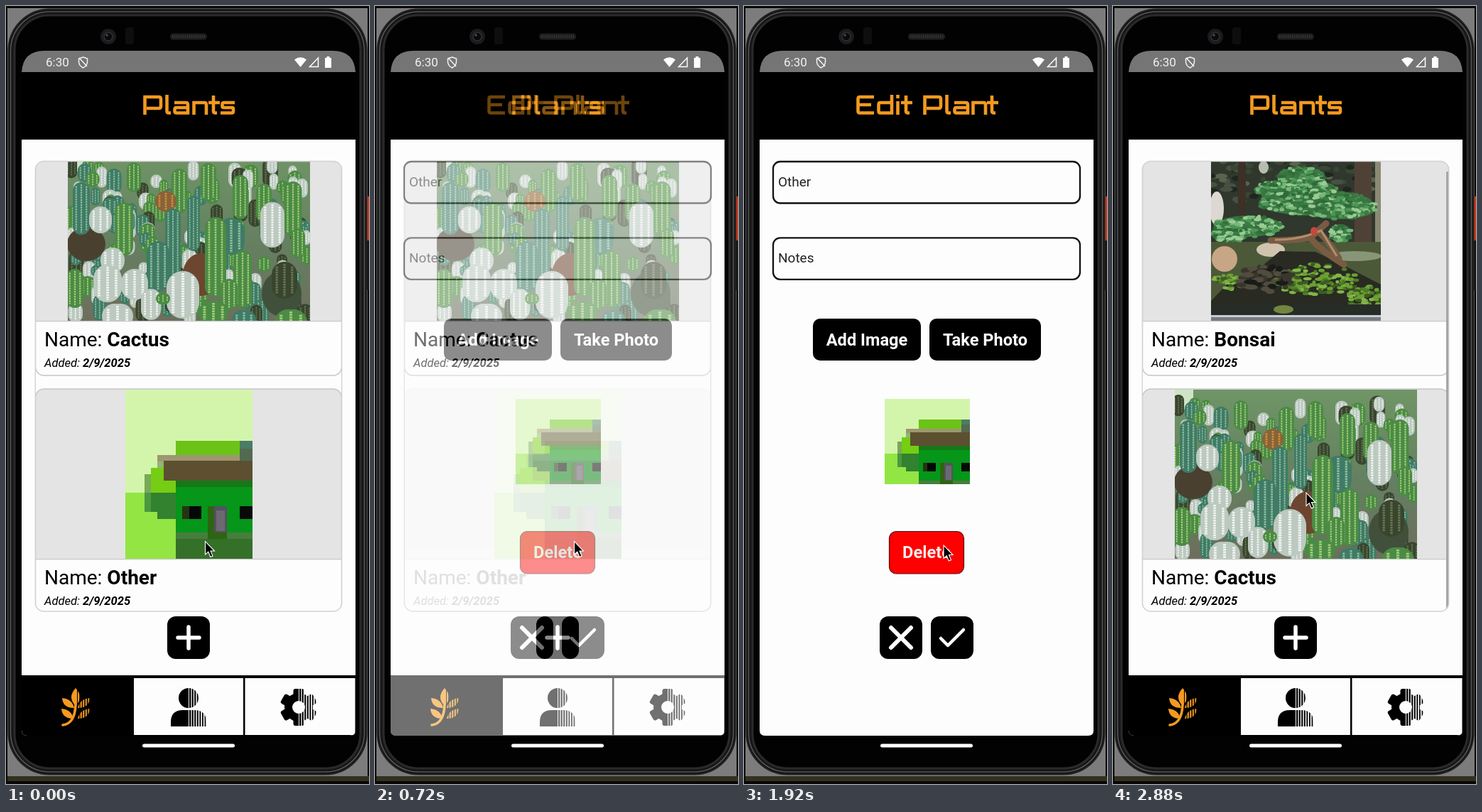
These frames come from a looping animation (511 by 1095 pixels, 2960 ms). An HTML page:

```html
<!DOCTYPE html>
<html lang="en">
<head>
<meta charset="utf-8">
<title>Plants</title>
<style>
html, body { margin: 0; width: 100%; height: 100%; overflow: hidden; background: #000; }
svg { display: block; width: 100%; height: 100%; font-family: Roboto, sans-serif; }
</style>
</head>
<body>
<svg id="stage" viewBox="0 0 511 1095"></svg>
<script>
const LOOP = 2960, STEP = 80;
const stage = document.getElementById('stage');

const rect = (x, y, w, h, fill, r = 0, extra = '') =>
  `<rect x="${x}" y="${y}" width="${w}" height="${h}" rx="${r}" fill="${fill}" ${extra}/>`;
const oval = (x, y, rx, ry, fill, extra = '') =>
  `<ellipse cx="${x}" cy="${y}" rx="${rx}" ry="${ry}" fill="${fill}" ${extra}/>`;
const path = (d, fill, extra = '') => `<path d="${d}" fill="${fill}" ${extra}/>`;
const line = (d, color, width, extra = '') =>
  path(d, 'none', `stroke="${color}" stroke-width="${width}" ${extra}`);
const text = (x, y, size, str, extra = '') =>
  `<text x="${x}" y="${y}" font-size="${size}" ${extra}>${str}</text>`;
const clip = (id, shape) => `<clipPath id="${id}">${shape}</clipPath>`;

function seeded(seed) {
  return () => (seed = (seed * 16807) % 2147483647) / 2147483647;
}

// Title lettering, drawn as strokes on a baseline at 0
const GLYPHS = {
  P: 'M2.5 0V-25H22Q25 -25 25 -22V-12Q25 -9 22 -9H5',
  E: 'M25 -25H5Q2.5 -25 2.5 -22V-5Q2.5 -2.5 5 -2.5H25M3 -14H21',
  l: 'M2.5 -28V-5Q2.5 -2.5 5 -2.5H8',
  a: 'M2 -17H18Q21 -17 21 -14V-2.5H5Q2.5 -2.5 2.5 -5V-7Q2.5 -10 5 -10H20',
  n: 'M2.5 0V-17H17Q20 -17 20 -14V0',
  t: 'M7 -27V-5Q7 -2.5 10 -2.5H12M0 -17H16',
  s: 'M20 -17H5Q2.5 -17 2.5 -15V-12Q2.5 -10 5 -10H16Q18 -10 18 -8V-5Q18 -2.5 16 -2.5H0',
  d: 'M21 -28V-2.5H5Q2.5 -2.5 2.5 -5V-14Q2.5 -17 5 -17H20',
  i: 'M2.5 0V-19M2.5 -23V-28'
};
const title = (letters, xs) => [...letters].map((c, i) =>
  line(GLYPHS[c], '#f39a1f', 4.6, `transform="translate(${xs[i]} 153)"`)).join('');

function cactusPhoto() {
  const rnd = seeded(41);
  const tones = [
    ['#4b8b45', '#a3cd78'], ['#3f7b66', '#8dbd9c'], ['#bcc9c0', '#f1f5f0'],
    ['#39452f', '#687850'], ['#8a6238', '#c9923f']
  ];
  const plant = (x, top, w, bottom, tone) => {
    const [body, rib] = tones[tone];
    let out = rect(x - w / 2, top, w, bottom - top, body, Math.min(w, bottom - top) / 2);
    for (const k of [-0.3, 0, 0.3]) {
      const inset = 3 + Math.abs(k) * w * 0.35;
      out += line(`M${x + k * w} ${top + inset}V${bottom - inset}`, rib, Math.max(1.4, w * 0.09), 'stroke-dasharray="2.5 1"');
    }
    return out;
  };
  let out = rect(87, 205, 341, 238, 'url(#field)') + rect(87, 205, 26, 28, '#cfe3c6');
  for (let i = 0; i < 150; i++) {
    const y = 212 + i * 1.4, x = 92 + rnd() * 332, w = 12 + rnd() * 10;
    const pick = rnd();
    const tone = pick < 0.3 ? 0 : pick < 0.52 ? 1 : pick < 0.82 ? 2 : 3;
    out += plant(x, y, w, y + w * (1.1 + rnd()), tone);
  }
  out += oval(113, 335, 27, 24, '#4a4030') + oval(275, 378, 26, 30, '#6d4630') + oval(388, 405, 28, 32, '#41503a');
  const grid = [
    [180, 220, 20, 262, 0], [285, 221, 22, 275, 0], [244, 229, 22, 292, 0],
    [330, 238, 22, 300, 0], [363, 250, 22, 305, 0], [106, 248, 24, 322, 1],
    [404, 247, 25, 325, 0], [225, 260, 30, 290, 4], [133, 282, 32, 320, 2],
    [375, 276, 34, 340, 2], [166, 276, 26, 352, 0], [264, 267, 18, 345, 1],
    [411, 313, 20, 355, 0], [235, 285, 22, 385, 1], [150, 340, 34, 376, 2],
    [97, 370, 24, 425, 0], [214, 331, 32, 402, 1], [317, 298, 38, 350, 1],
    [295, 297, 30, 410, 0], [333, 344, 26, 425, 0], [314, 384, 24, 428, 0],
    [392, 360, 36, 412, 3], [143, 364, 40, 417, 2], [181, 370, 38, 414, 2],
    [249, 373, 46, 440, 2], [204, 398, 28, 442, 2]
  ];
  out += grid.map(p => plant(...p)).join('');
  for (const [x, y, w, tone] of [[157, 419, 44, 2], [221, 404, 20, 0], [292, 415, 42, 0], [335, 428, 34, 1], [401, 427, 46, 0]])
    out += plant(x, y, w, y + w * 0.8, tone);
  return `<g id="cactus" clip-path="url(#cactusBox)">${out}</g>`;
}

function bonsaiPhoto() {
  const rnd = seeded(77);
  const scatter = (cx, cy, rx, ry, n, colors, size) => {
    let out = '';
    for (let i = 0; i < n; i++) {
      const a = rnd() * 6.283, r = Math.sqrt(rnd());
      out += oval(cx + rx * r * Math.cos(a), cy + ry * r * Math.sin(a), size * (0.6 + rnd()), size * 0.6,
        colors[Math.floor(rnd() * colors.length)]);
    }
    return out;
  };
  const leaves = ['#2f6a3a', '#4d9656', '#76b878', '#9acb95', '#3b7c45'];
  const moss = ['#4d7e25', '#6c9f35', '#83b548', '#3c5c22'];
  const canopy = [[265, 240, 34, 13], [258, 258, 58, 14], [285, 277, 80, 18], [320, 284, 52, 16], [190, 310, 48, 15], [165, 322, 26, 10], [320, 320, 15, 13]];
  let out = rect(138, 205, 239, 238, '#30372c');
  out += scatter(255, 240, 130, 45, 130, ['#1e271e', '#465142', '#394636', '#59634f'], 6);
  out += rect(176, 219, 11, 75, '#3c3027') + rect(340, 219, 24, 125, '#504136') + rect(369, 219, 8, 120, '#8b8a75');
  out += oval(146, 285, 10, 24, '#dcd8d1') + oval(212, 227, 7, 9, '#b6bdb0');
  out += rect(138, 332, 239, 111, '#4c5938') + oval(157, 356, 18, 18, '#c6a685') + oval(222, 343, 20, 10, '#d1c4af') + oval(340, 352, 38, 7, '#889576');
  out += path('M138 415L165 387L205 370L235 345L285 346L325 365L377 392V425H138Z', '#292a22');
  out += scatter(285, 385, 58, 22, 140, moss, 4) + scatter(165, 388, 25, 11, 45, moss, 3.5) + scatter(354, 409, 25, 17, 65, moss, 4);
  out += scatter(215, 384, 40, 18, 55, ['#181b18', '#39372d', '#514c3e'], 6);
  out += line('M222 330Q255 330 278 326L300 306M278 327Q294 345 325 364M292 320Q307 336 318 355', '#795b44', 9, 'stroke-linecap="round"');
  out += line('M228 329Q260 330 293 316L315 352', '#b18d6a', 3);
  for (const [x, y, rx, ry] of canopy)
    out += oval(x, y, rx, ry, '#39743f') + scatter(x, y, rx, ry, Math.round(rx * 2.5), leaves, 3.8);
  out += oval(283, 317, 5, 6, '#c9473b') + rect(138, 420, 239, 17, '#272c26') + oval(240, 427, 14, 6, '#728640');
  out += rect(138, 435, 239, 3, '#c8cbd0') + rect(138, 438, 239, 5, '#777a82');
  return `<g id="bonsai" clip-path="url(#bonsaiBox)">${out}</g>`;
}

// Blocky house, in the coordinates of the lower card
const house = '<g id="house" shape-rendering="crispEdges">' + [
  [168, 540, 179, 238, '#d3f5ab'], [168, 685, 71, 93, '#93e543'], [239, 612, 90, 20, '#6bc317'],
  [213, 632, 9, 27, '#91b66f'], [204, 650, 35, 36, '#75ce13'], [195, 659, 9, 53, '#78a957'],
  [204, 685, 35, 27, '#32822f'], [195, 685, 9, 27, '#4a9840'], [213, 712, 26, 10, '#32822f'],
  [213, 632, 116, 9, '#9e976f'], [222, 640, 125, 28, '#5c5030'], [329, 612, 18, 11, '#4b7c68'],
  [329, 623, 18, 17, '#526a50'], [239, 668, 108, 9, '#167817'], [239, 677, 108, 73, '#05961a'],
  [239, 741, 108, 9, '#477d3d'], [239, 750, 108, 28, '#357029'], [248, 704, 27, 18, '#050805'],
  [248, 704, 10, 18, '#263414'], [329, 704, 18, 18, '#080a08'], [284, 704, 27, 46, '#2d6512'],
  [293, 704, 18, 37, '#56515e'], [296, 710, 12, 29, '#6c6973']
].map(b => rect(...b)).join('') + '</g>';

const use = (id, dy = 0) => `<use href="#${id}" transform="translate(0 ${dy})"/>`;

function card(dy, name, picture, id = '') {
  return `<g ${id && `id="${id}"`} transform="translate(0 ${dy})">
    ${rect(41.5, 204, 431, 316, '#fdfdfd', 12)}
    <g clip-path="url(#cardBox)">${rect(41, 204, 432, 239, '#e4e4e4')}${picture}${rect(41, 443, 432, 1.3, '#c9c9c9')}</g>
    ${rect(41.5, 204, 431, 316, 'none', 12, 'stroke="#c6c6c6" stroke-width="1.5"')}
    ${text(54, 479, 28, `Name: <tspan font-weight="700">${name}</tspan>`)}
    ${text(54, 508, 16.5, 'Added: <tspan font-weight="700">2/9/2025</tspan>', 'font-style="italic"')}
  </g>`;
}
const list = (id, cards) => `<g id="${id}"><g clip-path="url(#listBox)">${cards}</g>
  ${rect(41.3, 218.5, 431.4, 633.5, 'none', 12, 'stroke="#d2d2d2" stroke-width="1.4"')}</g>`;

const iconBox = x => rect(x, 859, 60, 60, '#000', 12);
const sign = (d, w) => line(d, '#fff', w, 'stroke-linecap="round" stroke-linejoin="round"');

function stripeMask(id, x) {
  let out = rect(x - 50, 940, 50, 90, '#fff');
  for (let i = 0; i < 8; i++) out += rect(x + 1 + i * 3.6, 940, 2.3 - i * 0.1, 90, '#fff');
  return `<mask id="${id}" maskUnits="userSpaceOnUse" x="${x - 50}" y="940" width="100" height="90">${out}</mask>`;
}
function tabs() {
  const leaf = (x, y, flip) => path('M0 0Q-16 0 -17 -14Q-3 -13 0 0Z', '#f39a1f', `transform="translate(${x} ${y}) scale(${flip} 1)"`);
  const plant = path('M98 960Q110 973 98 985Q86 973 98 960Z', '#f39a1f') +
    leaf(96, 988, 1) + leaf(101, 988, -1) + leaf(95, 1003, 1) + leaf(101, 1003, -1) +
    line('M80 1012Q97 1010 98 983', '#f39a1f', 3.6, 'stroke-linecap="round"');
  const person = oval(257, 974, 14, 14, '#000') + path('M232 1014V1008Q232 991 249 991H265Q282 991 282 1008V1014Z', '#000');
  let gear = '<circle cx="412" cy="987" r="14.5" fill="none" stroke="#000" stroke-width="11"/>';
  for (let i = 0; i < 6; i++)
    gear += rect(404.5, 961, 15, 11, '#000', 3, `transform="rotate(${i * 60} 412 987)"`);
  const icon = (id, art) => `<g mask="url(#${id})">${art}</g>`;
  return rect(22, 942, 470, 85, '#000') + rect(180, 946, 154, 80, '#fdfdfd') + rect(336.5, 946, 155, 80, '#fdfdfd') +
    icon('m1', plant) + icon('m2', person) + icon('m3', gear);
}

const defs = `<defs>
  <linearGradient id="field" x1="0" y1="0" x2="0" y2="1">
    <stop offset="0" stop-color="#6f9566"/><stop offset=".55" stop-color="#657f61"/><stop offset="1" stop-color="#6d6e5c"/>
  </linearGradient>
  ${clip('cactusBox', rect(87, 205, 341, 238))}${clip('bonsaiBox', rect(138, 205, 239, 238))}
  ${clip('cardBox', rect(41.5, 204, 431, 316, '#000', 12))}${clip('listBox', rect(41, 218, 432, 634.5, '#000', 12))}
  ${clip('thumbBox', rect(198, 553, 120, 120))}
  ${clip('screen', path('M22 93Q24 63 54 63H460Q490 63 492 93V1019Q492 1027 484 1027H30Q22 1027 22 1019Z'))}
  ${stripeMask('m1', 100)}${stripeMask('m2', 257)}${stripeMask('m3', 412)}
  ${cactusPhoto()}${bonsaiPhoto()}${house}
</defs>`;

const phone = rect(0, 0, 511, 1095, '#080808') + rect(2, 3, 507, 1081, '#7c7c7c') + rect(2, 1084, 509, 7, '#34301f') +
  rect(508, 268, 3, 62, '#c53a20') + rect(508, 330, 3, 70, '#151515') +
  rect(3.5, 4.5, 504, 1077, '#121212', 58, 'stroke="#222" stroke-width="2"') +
  rect(6.5, 8, 498, 1070, '#161616', 55, 'stroke="#55565a" stroke-width="1.6"') +
  rect(12, 13, 487, 1060, '#020202', 49, 'stroke="#2a2a2c" stroke-width="3"') +
  oval(144, 43, 11, 11, '#1b1b1d') + oval(144, 43, 6, 6, '#0a0a0c', 'stroke="#303036" stroke-width="1.5"') + oval(142, 41, 1.8, 1.8, '#46464e') +
  rect(168, 30, 12, 24, '#0e0e0f', 3) + rect(231, 38.5, 52, 9, '#1e1e1f', 4.5) +
  line('M234 43H280', '#343435', 4, 'stroke-dasharray="1.5 1.5"');

const status = rect(22, 63, 470, 30, '#757575') + text(56, 85, 17, '6:30', 'fill="#f2f2f2"') +
  line('M108.5 72L114.5 74V79Q114 84 108.5 87Q103 84 102.5 79V74ZM103 73L114 85', '#f2f2f2', 1.5) +
  path('M406 75.5Q414.500 69 423 75.5L414.500 86Z', '#fff') +
  line('M427.500 85.500H439.500V73Z', '#fff', 1.5) + path('M449 73H451.500V71H455.500V73H458V87H449Z', '#fff');

const screenBase = rect(22, 93, 470, 95, '#000') + rect(22, 188, 470, 839, '#fdfdfd');

const home = screenBase + title('Plants', [193, 224, 235, 262, 285, 302]) +
  list('before', card(0, 'Cactus', use('cactus')) + card(335, 'Other', use('house', -335), 'pressed')) +
  list('after', card(0, 'Bonsai', use('bonsai')) + card(335, 'Cactus', use('cactus')) + rect(469, 233, 3.5, 617, '#a6a6a6', 1)) +
  iconBox(227) + sign('M257 874V904M242 889H272', 5.5) + tabs();

const field = (y, str) => rect(41, y, 432, 58.5, '#fdfdfd', 10, 'stroke="#111" stroke-width="2.3"') + text(48, y + 35, 19, str, 'fill="#222"');
const button = (x, w, str) => rect(x, 440, w, 59, '#000', 10) +
  text(x + w / 2, 478, 23.6, str, 'fill="#fff" font-weight="700" text-anchor="middle"');

const edit = `<g id="edit">${screenBase}
  ${title('EditPlant', [158, 187, 214, 221, 252, 283, 294, 320, 342])}
  ${field(219, 'Other')}${field(326.3, 'Notes')}
  ${button(97, 152, 'Add Image')}${button(261, 157, 'Take Photo')}
  <g clip-path="url(#thumbBox)"><use href="#house" transform="translate(258 613) scale(.67) translate(-257.5 -659)"/></g>
  <g id="remove">${rect(204.500, 739.500, 105, 59.5, '#fe0000', 10, 'stroke="#531010" stroke-width="1.2"')}
  ${text(257, 777, 23.6, 'Delete', 'fill="#f4eaea" font-weight="700" text-anchor="middle"')}</g>
  ${iconBox(191)}${sign('M207 875L235 903M235 875L207 903', 6)}
  ${iconBox(263)}${sign('M277 890L287 900L309 878', 4.5)}
</g>`;

stage.innerHTML = defs + phone + `<g clip-path="url(#screen)">${status}${home}${edit}</g>` +
  rect(192, 1038.5, 130, 5, '#fff', 2.5) +
  `<g id="cursor"><circle id="touch" cx="1" cy="5" r="11" fill="#dfe5df" fill-opacity=".85"/>
  ${path('M0 0V18.500L4.300 14.600L7.300 22L10.500 20.600L7.500 13.500H13Z', '#000', 'stroke="#fff" stroke-width="1.1"')}</g>`;

const el = id => document.getElementById(id);
const part = Object.fromEntries(['before', 'after', 'pressed', 'edit', 'remove', 'cursor', 'touch'].map(id => [id, el(id)]));
const ramp = (t, a, b) => Math.max(0, Math.min(1, (t - a) / (b - a)));
const ease = p => p * p * (3 - 2 * p);
const fade = (node, value) => node.setAttribute('opacity', value);

function draw(time) {
  const t = Math.floor((time % LOOP) / STEP) * STEP;
  const deleted = t >= 2000;
  part.before.style.display = deleted ? 'none' : '';
  part.after.style.display = deleted ? '' : 'none';
  fade(part.pressed, 1 - 0.8 * ease(ramp(t, 500, 660)));
  fade(part.edit, t < 1500 ? ramp(t, 640, 820) : 1 - ramp(t, 2140, 2370));
  fade(part.remove, 1 - 0.78 * ease(ramp(t, 1980, 2140)));
  const touching = (t >= 560 && t < 640) || (t >= 2000 && t < 2160);
  part.touch.style.display = touching ? '' : 'none';
  const nudge = ease(ramp(t, 1120, 1440)), leave = ease(ramp(t, 2640, 2880));
  const x = 280.5 + 0.5 * nudge - 9 * leave;
  const y = 753.5 + 5.5 * nudge - 74 * leave;
  part.cursor.setAttribute('transform', `translate(${x} ${y})`);
}

const start = performance.now();
function tick() {
  draw(performance.now() - start);
  requestAnimationFrame(tick);
}
draw(0);
requestAnimationFrame(tick);
</script>
</body>
</html>
```
